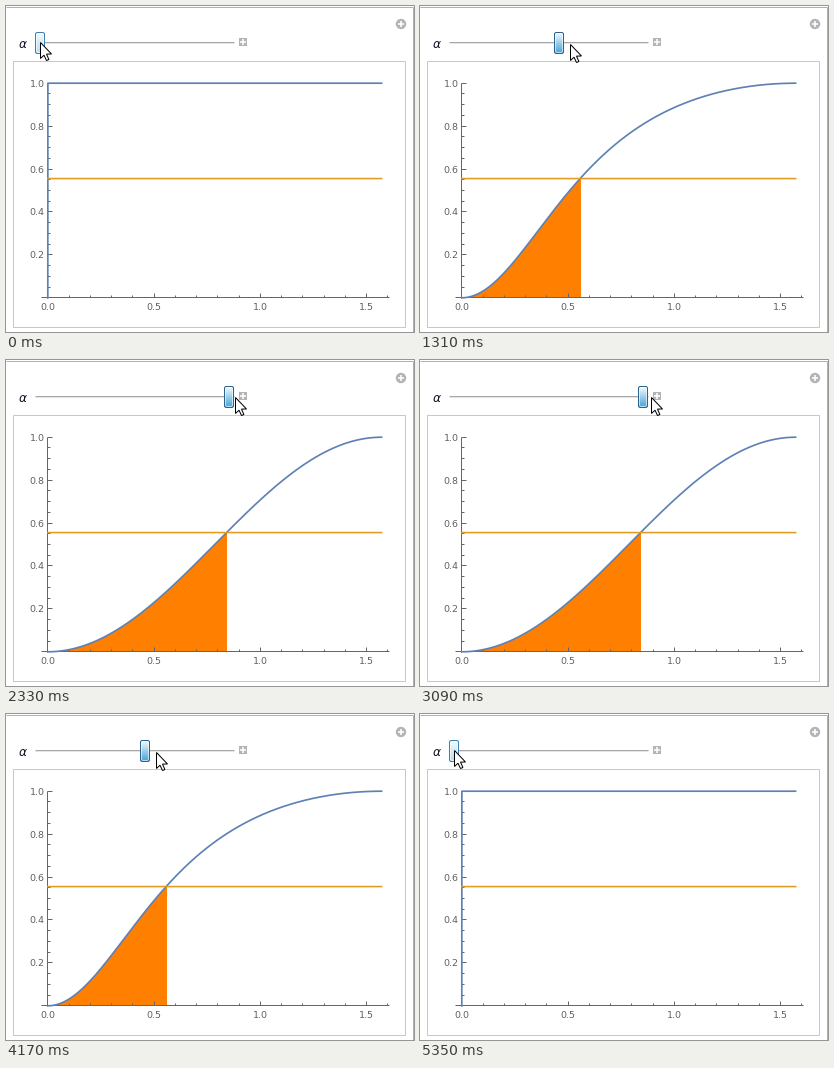
These frames come from a looping animation (408 by 326 pixels, 5.56 s). A matplotlib script:

```python
import numpy as np
import matplotlib.pyplot as plt
from matplotlib.animation import FuncAnimation
from matplotlib.collections import LineCollection
from matplotlib.colors import to_rgb
from matplotlib.patches import Circle, FancyBboxPatch, Polygon, Rectangle

W, H, DPI = 408, 326, 100
LOOP, TICK = 5560, 10
PX = 72 / DPI

BLUE, GOLD, FILL = "#5e81b5", "#e19c24", "#ff8000"
AXIS, LABEL, ICON = "#666666", "#606060", "#b4b4b4"
LEVEL = 5 / 9

# The drag advances in four runs of eight steps, then the pointer rests.
RUNS = [(210, 740), (800, 1310), (1390, 1910), (1970, 2470)]
STEPS = np.concatenate([np.linspace(a, b, 8) for a, b in RUNS] + [[2620, 2700]])
STEPS = np.round(STEPS / TICK) * TICK

LEFT, RIGHT = 34, 223  # thumb range


def thumb_x(s):
    return round(min(LEFT + s * (4.38 + 0.1924 * s - 0.003573 * s**2), RIGHT))


def mouse_xy(s):
    x = LEFT + s * (6.475 + 0.0463 * s + 0.002 * s**2 - 0.0001168 * s**3)
    return round(x), round(37 - 2 * np.sin(2 * np.pi * (s + 2) / 33))


def px(x):
    return 41.8 + 212.5 * np.asarray(x)


def py(y):
    return 291.8 - 214.6 * np.asarray(y)


def curve(x, a):
    s, c = np.sin(x) ** 2, (a * np.cos(x)) ** 2
    return np.where(x > 0, s / np.maximum(s + c, 1e-12), 0)


def gradient(top, bottom):
    u = np.linspace(0, 1, 20)[:, None, None]
    return (1 - u) * np.array(to_rgb(top)) + u * np.array(to_rgb(bottom))


fig = plt.figure(figsize=(W / DPI, H / DPI), dpi=DPI, facecolor="white")
ax = fig.add_axes([0, 0, 1, 1])
ax.axis("off")


def lines(segments, color, width=1, z=1):
    ax.add_collection(LineCollection(segments, colors=color, linewidths=width * PX,
                                     zorder=z, capstyle="butt"))


def text(x, y, s, ha="center", size=9.5, color=LABEL, **kw):
    ax.text(x, y, s, ha=ha, va="center_baseline", fontsize=size * PX, color=color,
            family="DejaVu Sans", **kw)


def plus(x, y, r):
    lines([[(x - r, y), (x + r, y)], [(x, y - r), (x, y + r)]], "white", 1.6, 3)


# Window frame and controls; whole numbers snap to pixel centres
lines([[(0, 1), (407, 1)], [(407, 1), (407, H)]], "#b0b0b0")
ax.add_patch(Rectangle((7, 55), 392, 266, fc="white", ec="#c8c8c8", lw=PX))
ax.add_patch(Circle((395, 18), 5.2, fc=ICON, ec="none", zorder=2))
plus(395, 18, 3)
ax.add_patch(Rectangle((233, 32), 8, 8, fc=ICON, ec="none", zorder=2))
plus(237, 36, 3)
lines([[(29, 36), (228, 36)]], "#a8a8a8")
lines([[(29, 37), (228, 37)]], "#e4e4e4")
text(17, 36.5, "α", size=12.2, color="#16162a", style="italic")

# Axes
axes = [[(35, 291), (383, 291)], [(41, 77), (41, 292)]]
for k in range(17):
    x = px(k / 10) - 0.5
    axes.append([(x, 291), (x, 287 if k % 5 == 0 else 289)])
for k in range(1, 21):
    y = py(k / 20) - 0.5
    axes.append([(41, y), (46 if k % 4 == 0 else 44, y)])
lines(axes, AXIS, 1, 2.5)
for v in np.arange(0, 2, 0.5):
    text(px(v) - 0.3, 300.3, f"{v:.1f}")
for v in np.arange(1, 6) / 5:
    text(38.5, py(v), f"{v:.1f}", ha="right")

# Moving parts
xs = np.pi / 2 * np.linspace(0, 1, 240) ** 2
area = ax.add_patch(Polygon([(42, 292)] * 3, fc=FILL, ec="none", zorder=2))
graph, = ax.plot([], [], color=BLUE, lw=1.7 * PX, zorder=3, solid_joinstyle="round")
ax.plot(px([0, np.pi / 2]), [py(LEVEL)] * 2, color=GOLD, lw=1.6 * PX, zorder=4,
        snap=False)

HOVER = "#3c7fb1", gradient("#f2fafe", "#b4def5")
PRESSED = "#2c628b", gradient("#eef8fd", "#4aa5d8")
IDLE = "#707070", gradient("#f3f3f3", "#cfcfcf")
face = ax.imshow(HOVER[1], extent=(30, 38, 47, 27), aspect="auto", zorder=6)
glow, rim = [ax.add_patch(FancyBboxPatch((LEFT, 26.5 + d), 9 - 2 * d, 21 - 2 * d,
                                         boxstyle="round,pad=0,rounding_size=1.8",
                                         fc="none", ec=(1, 1, 1, 0.6), lw=PX, zorder=7))
             for d in (1, 0)]
ARROW = np.array([(0.5, 0.5), (0.5, 16.5), (4, 13.2), (6.5, 18.5), (8.9, 17.5),
                  (6.5, 12.1), (11.5, 12)])
arrow = ax.add_patch(Polygon(ARROW, fc="white", ec="black", lw=PX, zorder=9))

ax.set_xlim(0, W)
ax.set_ylim(H, 0)
ax.set_autoscale_on(False)


def draw(n):
    t = n * TICK
    step = int(np.searchsorted(STEPS, min(t, LOOP - TICK - t), side="right"))
    thumb = thumb_x(step)
    a = (thumb - LEFT + 0.5) / (RIGHT - LEFT + 0.5) if step else 0

    graph.set_data(px(xs), py(curve(xs, a)))
    end = np.arctan(a * np.sqrt(LEVEL / (1 - LEVEL)))
    u = np.linspace(0, end, 80)
    edge = np.ceil(px(end))
    area.set_visible(a > 0)
    area.set_xy(np.vstack([np.column_stack([px(u), py(curve(u, a))]),
                           [(edge, py(LEVEL)), (edge, 292), (42, 292)]]))

    border, shade = HOVER if step == 0 else IDLE if step == len(STEPS) else PRESSED
    face.set_data(shade)
    face.set_extent((thumb - 4, thumb + 4, 47, 27))
    rim.set_x(thumb - 4.5)
    rim.set_edgecolor(border)
    glow.set_x(thumb - 3.5)
    arrow.set_xy(ARROW + mouse_xy(step))
    return graph, area, face, glow, rim, arrow


anim = FuncAnimation(fig, draw, frames=LOOP // TICK, interval=TICK, repeat=True,
                     repeat_delay=0, blit=False)
plt.show()
```
